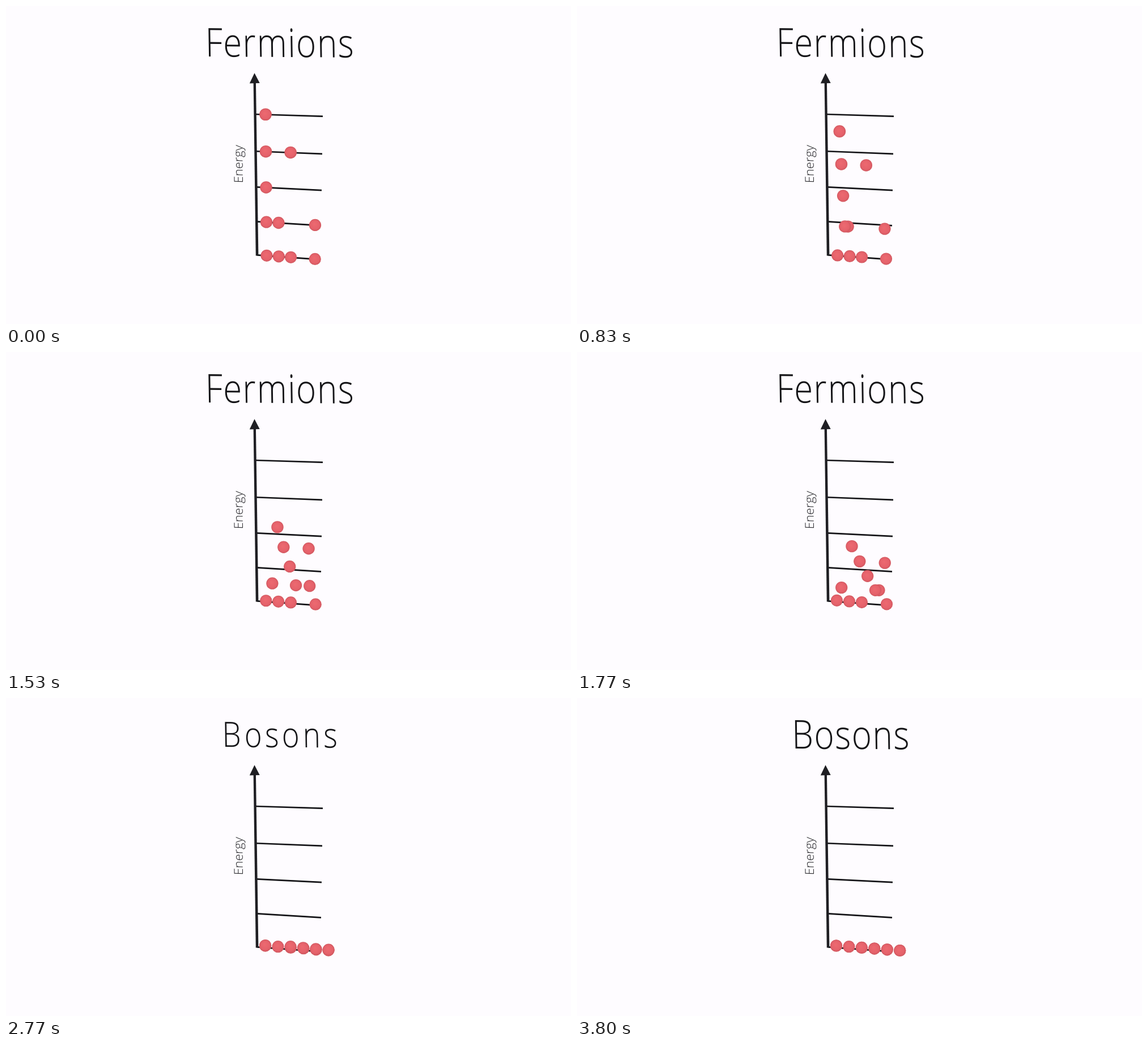
Write an HTML page with a canvas that moves like this. It is 997 by 561 pixels and loops after 5210 ms.

```html
<!DOCTYPE html>
<html lang="en">
<head>
<meta charset="utf-8">
<title>Energy levels</title>
<style>
  html, body { margin: 0; width: 100%; height: 100%; overflow: hidden; background: #fefcff; }
  canvas { display: block; width: 997px; height: 561px; }
</style>
</head>
<body>
<canvas id="stage"></canvas>
<script>
const WIDTH = 997, HEIGHT = 561, LOOP = 5210;
const PAPER = '#fefcff', INK = '#141417';
const FONT = '"Open Sans", "Noto Sans", sans-serif';
const TITLE_FONT = `300 70px ${FONT}`;
const TITLE_X = 482.6, TITLE_SPREAD = 263.5, FORESHORTENING = 0.86;
const SLOTS = 6;

// Occupied places on each energy level, top to bottom.
const rows = ['o', 'o.o', 'o', 'oo..o', 'ooo.o'];

const canvas = document.getElementById('stage');
const ctx = canvas.getContext('2d');
const ratio = window.devicePixelRatio || 1;
canvas.width = Math.round(WIDTH * ratio);
canvas.height = Math.round(HEIGHT * ratio);

const progress = (t, from, to) => Math.min(1, Math.max(0, (t - from) / (to - from)));
const smooth = u => u * u * (3 - 2 * u);
const mix = (a, b, k) => a + (b - a) * k;

// The levels draw closer, shorter and steeper towards the bottom.
function level(i) {
  const y = 191 + 66.3 * i - 1.05 * i * i;
  return { x1: 439.8 + 0.8 * i, y1: y, x2: 559 - i, y2: y + 3.6 + 1.1 * i };
}

function place(i, column) {
  const { x1, y1, x2, y2 } = level(i);
  const x = 458 + 0.5 * i + column * (22 - 0.17 * i);
  return { x, y: mix(y1, y2, (x - x1) / (x2 - x1)) - 0.3 };
}

const slotPlace = slot => ({ x: 457.5 + 22.45 * slot, y: 437 + 1.7 * slot });

const balls = rows.flatMap((row, i) => [...row].flatMap((mark, column) =>
  mark === 'o'
    ? [{ from: place(i, column), to: slotPlace((i + column + 2) % SLOTS) }]
    : []
)).reverse();

function polygon(...points) {
  ctx.beginPath();
  points.forEach(([x, y]) => ctx.lineTo(x, y));
  ctx.fill();
}

function drawChart() {
  ctx.strokeStyle = INK;
  ctx.lineWidth = 2.7;
  rows.forEach((_, i) => {
    const { x1, y1, x2, y2 } = level(i);
    ctx.beginPath();
    ctx.moveTo(x1, y1);
    ctx.lineTo(x2, y2);
    ctx.stroke();
  });

  ctx.fillStyle = '#1f1f23';
  polygon([436.6, 132], [440.9, 132], [445.4, 440.5], [440.8, 440.5]);
  polygon([438.5, 118.3], [447.7, 136], [429.8, 136.6]);

  ctx.save();
  ctx.transform(-0.015, -1, 0.98, 0.03, 417.5, 279);
  ctx.font = `300 22px ${FONT}`;
  ctx.textAlign = 'center';
  ctx.fillStyle = '#222226';
  ctx.fillText('Energy', 0, 0);
  ctx.restore();
}

function drawBall(x, y) {
  const r = 10.6 + (440 - y) * 0.001;
  const shade = ctx.createRadialGradient(x - 1.5, y - 2, 1, x, y, r);
  shade.addColorStop(0, '#ec6970');
  shade.addColorStop(0.7, '#e5626b');
  shade.addColorStop(1, '#d1575f');
  ctx.fillStyle = shade;
  ctx.beginPath();
  ctx.arc(x, y, r, 0, Math.PI * 2);
  ctx.fill();
}

function drawBalls(t) {
  const k = smooth(progress(t, 260, 2900));
  balls.forEach(({ from, to }) => drawBall(mix(from.x, to.x, k), mix(from.y, to.y, k)));
}

// Every letter scales about its own centre, seen slightly from the side.
function drawTitle(word, scale) {
  if (scale < 0.01) return;
  ctx.font = TITLE_FONT;
  ctx.textAlign = 'center';
  ctx.fillStyle = INK;
  const measure = text => ctx.measureText(text).width;
  const spread = TITLE_SPREAD / measure('Fermions');
  let x = TITLE_X - measure(word) * spread / 2;
  for (const letter of word) {
    const advance = measure(letter) * spread;
    const middle = x + advance / 2;
    ctx.save();
    ctx.translate(middle, 64.4 + (middle - 367) * 0.007);
    ctx.scale(scale, scale);
    ctx.transform(FORESHORTENING, 0.01, 0.016, 1, 0, 0);
    ctx.fillText(letter, 0, 24.7);
    ctx.restore();
    x += advance;
  }
}

function render(t) {
  ctx.setTransform(ratio, 0, 0, ratio, 0, 0);
  ctx.fillStyle = PAPER;
  ctx.fillRect(0, 0, WIDTH, HEIGHT);
  drawTitle('Fermions', 1 - progress(t, 1813, 2450) ** 3);
  drawTitle('Bosons', 1 - (1 - progress(t, 2450, 3087)) ** 3);
  drawChart();
  drawBalls(t);
}

const start = performance.now();
function tick() {
  render((performance.now() - start) % LOOP);
  requestAnimationFrame(tick);
}
tick();
</script>
</body>
</html>
```
